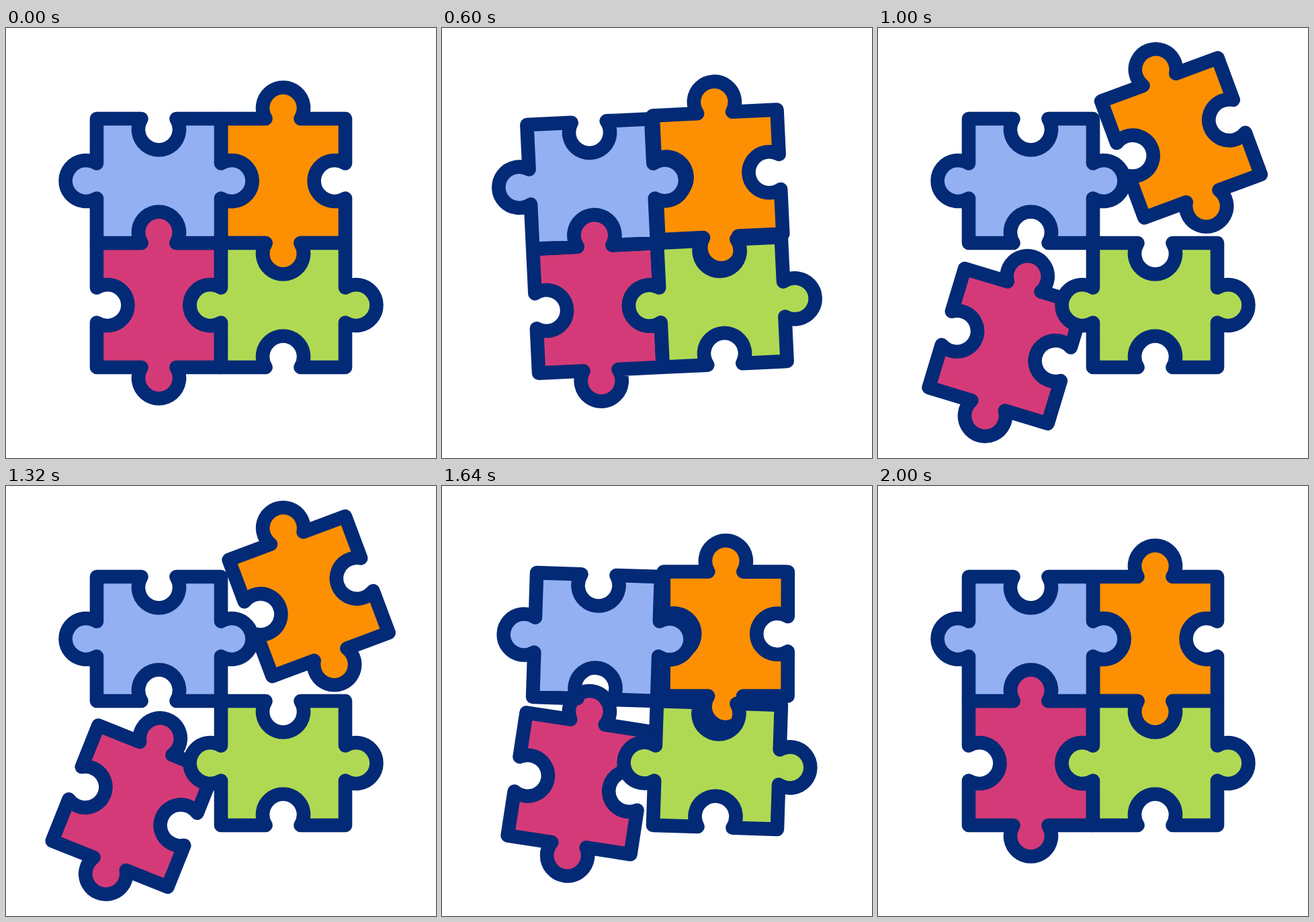
An HTML page for the animation above (2040 ms loop, 640 by 640 pixels).

```html
<!DOCTYPE html>
<html lang="en">
<head>
<meta charset="utf-8">
<title>Puzzle</title>
<style>
  html, body { margin: 0; width: 100%; height: 100%; overflow: hidden; background: #fff; }
  svg { display: block; width: 100vw; height: 100vh; }
  use { stroke: #032a76; stroke-width: 20.6; stroke-linejoin: round; }
  #board { transform-origin: 320px 320px; }
  #orange { transform-origin: 412.5px 227.5px; }
  #pink { transform-origin: 227.5px 412.5px; }
</style>
</head>
<body>
<svg viewBox="0 0 640 640">
  <defs>
    <path id="piece" d="M-92.5-92.5H-26A30.5 30.5 0 1 0 26-92.5H92.5V-26A30.5 30.5 0 1 1 92.5 26V92.5H26A30.5 30.5 0 1 0-26 92.5H-92.5V26A30.5 30.5 0 1 1-92.5-26Z"/>
  </defs>
  <g id="board">
    <g id="orange"><use href="#piece" fill="#fd9002" transform="translate(412.5 227.5) rotate(90)"/></g>
    <g id="pink"><use href="#piece" fill="#d53a78" transform="translate(227.5 412.5) rotate(90)"/></g>
    <use href="#piece" fill="#93b0f2" transform="translate(227.5 227.5)"/>
    <use href="#piece" fill="#b0d953" transform="translate(412.5 412.5)"/>
  </g>
</svg>
<script>
const LOOP = 2040, STEP = 40;
const OUT = 'ease', BACK = 'cubic-bezier(.75, 0, .75, .9)', SWING = 'cubic-bezier(.33, 0, .67, 1)';
const $ = id => document.getElementById(id);
const anims = [];

// keys: [time in ms, value, easing towards the next key]
function track(el, prop, keys) {
  const frames = keys.map(([t, value, easing = 'linear']) => ({ offset: t / LOOP, [prop]: value, easing }));
  const anim = el.animate(frames, { duration: LOOP, fill: 'both' });
  anim.pause();
  anims.push(anim);
}

// Leave home between a and b, return between c and d.
function trip(el, prop, home, away, [a, b, c, d]) {
  track(el, prop, [[a, home, OUT], [b, away], [c, away, BACK], [d, home]]);
}

// One swing to each side, as keys for the rotation of the board.
function swing(start, angle) {
  return [[0, 0], [.3, angle], [.7, -angle], [1, 0]]
    .map(([part, deg]) => [start + part * 600, `${deg}deg`, SWING]);
}

track($('board'), 'rotate', [...swing(360, -4), ...swing(1400, 2.7)]);

trip($('orange'), 'translate', '0px 0px', '38.5px -64px', [563, 1003, 1262, 1702]);
trip($('orange'), 'rotate', '0deg', '-22deg', [707, 1147, 1147, 1689]);

trip($('pink'), 'translate', '0px 0px', '-38.5px 64px', [680, 1120, 1336, 1776]);
trip($('pink'), 'rotate', '0deg', '22deg', [777, 1257, 1257, 1740]);

const start = performance.now();
function tick() {
  // The motion runs at 25 steps per second.
  const t = Math.floor((performance.now() - start + 8) / STEP) * STEP % LOOP;
  for (const anim of anims) anim.currentTime = t;
  requestAnimationFrame(tick);
}
tick();
</script>
</body>
</html>
```
